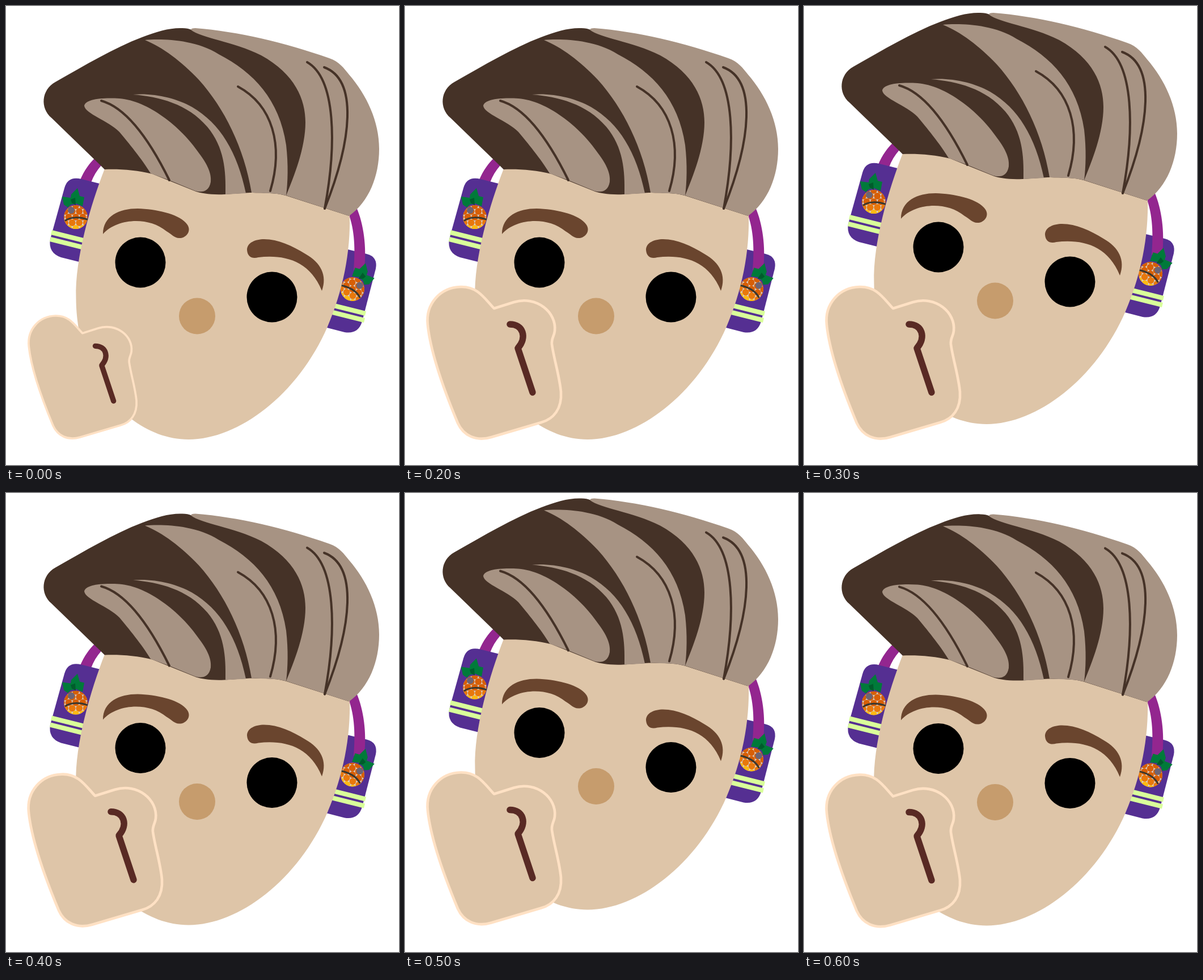
Write an HTML page with a canvas that moves like this. It is 693 px wide and 809 px high and loops after 700 ms.

```html
<!DOCTYPE html>
<html lang="en">
<head>
<meta charset="utf-8">
<title>Thinking face</title>
<style>
  html, body { margin: 0; width: 100%; height: 100%; overflow: hidden; background: #fff; }
  canvas { display: block; width: 693px; height: 809px; }
</style>
</head>
<body>
<canvas id="stage" width="693" height="809"></canvas>
<script>
const ctx = document.getElementById('stage').getContext('2d');
const LOOP = 700;

// Each pose holds until the next one starts.
const poses = [
  { at: 0, head: 0, hand: 0, small: true },
  { at: 200, head: 0, hand: 0 },
  { at: 300, head: -27, hand: 0 },
  { at: 400, head: -2.5, hand: 0.7 },
  { at: 500, head: -29.5, hand: -2.5 },
  { at: 600, head: -1.6, hand: 1.6 }
];

const skin = '#dec5a8', dark = '#453227', light = '#a79383';
const brow = '#6a452e', purple = '#552f92', magenta = '#93268f';
const lime = '#d9ff9a', green = '#007a3a';

function fill(d, color) {
  ctx.fillStyle = color;
  ctx.fill(new Path2D(d));
}

function stroke(d, color, width) {
  ctx.strokeStyle = color;
  ctx.lineWidth = width;
  ctx.lineCap = ctx.lineJoin = 'round';
  ctx.stroke(new Path2D(d));
}

function disc(x, y, r, color) {
  ctx.fillStyle = color;
  ctx.beginPath();
  ctx.arc(x, y, r, 0, Math.PI * 2);
  ctx.fill();
}

function stripes(x, y) {
  const band = 'l56 14 l-2 8 l-56 -14 Z';
  fill(`M${x} ${y} ${band}`, lime);
  fill(`M${x - 2} ${y + 12} ${band}`, lime);
}

function fruit(x, y, angle, flip) {
  ctx.save();
  ctx.translate(x, y);
  ctx.rotate(angle);
  ctx.scale(flip, 1);

  ctx.save();
  ctx.beginPath();
  ctx.arc(0, 0, 21, 0, Math.PI * 2);
  ctx.clip();
  disc(0, 0, 21, '#d3d3d3');
  for (let row = -2; row <= 2; row++) {
    const color = row < 1 ? '#d75f06' : row < 2 ? '#e8780c' : '#fdb913';
    for (let col = -2; col <= 2; col++) {
      disc(col * 12.5 + (row & 1) * 6.2, row * 10, 5.9, color);
    }
  }
  ctx.restore();

  disc(-8, -12, 6, '#6d6474');
  stroke('M-18 6 C-8 -1 8 0 20 4', '#38372f', 3);

  fill('M-24 -36 L-9 -34 L-8 -40 L3 -51 L7 -37 L15 -35 L12 -19 L1 -24 L-9 -22 L-14 -17 L-21 -22 Z', green);
  fill('M-9 -31 L-1 -34 L0 -21 L-7 -25 Z', '#005c2c');
  ctx.restore();
}

function headphones() {
  fill('M131 306 C138 290 147 277 157 268 L174 272 L174 288 L168 281 C160 290 154 300 150 311 Z', magenta);
  fill('M165 313 L133 305 Q109 299 103 321 L78 411 Q74 435 97 443 L129 451 L150 451 Z', purple);
  stripes(81, 395);
  fruit(123, 372, 0, 1);

  fill('M590 426 L636 437 Q656 442 652 463 L628 556 Q621 579 597 575 L566 567 Z', purple);
  fill('M602 352 L618 355 C631 385 636 425 632 464 L613 466 C616 430 615 395 604 366 Z', magenta);
  stripes(579, 524);
  fruit(611, 499, Math.PI / 6, -1);
}

function hair() {
  fill('M174 288 L80 197 C60 180 62 148 87 134 C140 104 190 74 240 55 C265 45 290 38 311 39 Q321 39 327 42 L575 96 L605 370 L493 334 C475 329 460 330 430 329 L385 332 C360 333 345 330 335 327 L258 296 C230 289 200 287 174 288 Z', dark);
  fill('M326 42 Q326 39 334 39 C410 45 490 64 570 92 C588 98 596 110 605 121 C636 157 658 203 658 252 C658 300 640 345 605 370 L494 334 C508 300 528 250 528 205 C528 165 510 120 450 87 C400 62 345 57 326 42 Z', light);
  fill('M245 60 C270 58 330 57 375 85 C437 117 482 165 494 245 C498 280 497 310 494 334 C475 329 455 330 433 329 C420 250 385 180 340 130 C310 98 275 72 245 60 Z', light);
  fill('M224 156 C260 153 300 162 328 178 C378 207 408 258 423 330 L387 332 C388 290 385 249 355 213 C320 172 270 160 224 156 Z', light);
  fill('M138 176 C140 165 165 161 200 163 C250 167 308 212 340 259 C360 285 362 300 361 310 C358 328 345 329 334 326 L288 307 L255 295 C240 270 215 240 200 222 C180 202 140 190 138 176 Z', light);

  stroke('M168 167 C215 180 255 240 288 307', dark, 4);
  stroke('M409 142 C470 175 490 245 466 326', dark, 4);
  stroke('M531 99 C582 128 583 245 562 357', dark, 4);
  stroke('M561 108 C621 130 610 237 562 357', dark, 4);
}

function head() {
  headphones();
  fill('M174 287 C150 348 121 445 123.5 515 C124 605 160 685 220 727 C250 750 285 764 322 764 C410 764 515 685 567 565 C594 502 608 435 606 365 L493 325 L335 315 L250 285 Z', skin);
  hair();
  fill('M171 402 C171 370 200 357 232 357 C265 358 302 366 317 382 C330 395 318 410 305 409 C297 409 292 402 283 397 C250 370 195 375 171 402 Z', brow);
  fill('M557 502 C567 475 555 452 528 437 C505 423 480 411 455 411 C440 411 425 417 425 430 C426 443 435 446 445 443 C490 438 535 448 557 502 Z', brow);
  disc(237, 452, 44.5, '#000');
  disc(469, 513, 44.5, '#000');
  disc(337, 546.5, 32, '#c69c6d');
}

function hand() {
  const outline = 'M157 533 L192 522 C232 510 268 540 264 573 C263 582 258 586 259 596 C262 620 272 650 275 680 C277 710 262 728 240 734 L152 760 C125 768 103 757 93 735 C70 680 45 610 40 562 C36 525 62 496 98 495 C128 494 140 515 157 533 Z';
  fill(outline, skin);
  stroke(outline, '#ffe1c4', 4.6);
  stroke('M185 561 C208 561 216 584 199 603 L225 681', '#592a24', 11.5);
}

function draw(t) {
  const pose = poses.findLast(p => p.at <= t);
  ctx.setTransform(1, 0, 0, 1, 0, 0);
  ctx.fillStyle = '#fff';
  ctx.fillRect(0, 0, 693, 809);

  ctx.translate(0, pose.head);
  head();

  const s = pose.small ? 0.8075 : 1;
  ctx.setTransform(s, 0, 0, s, pose.small ? 8 : 0, pose.small ? 146.3 : pose.hand);
  hand();
}

const start = performance.now();
function tick() {
  draw((performance.now() - start) % LOOP);
  requestAnimationFrame(tick);
}
tick();
</script>
</body>
</html>
```
